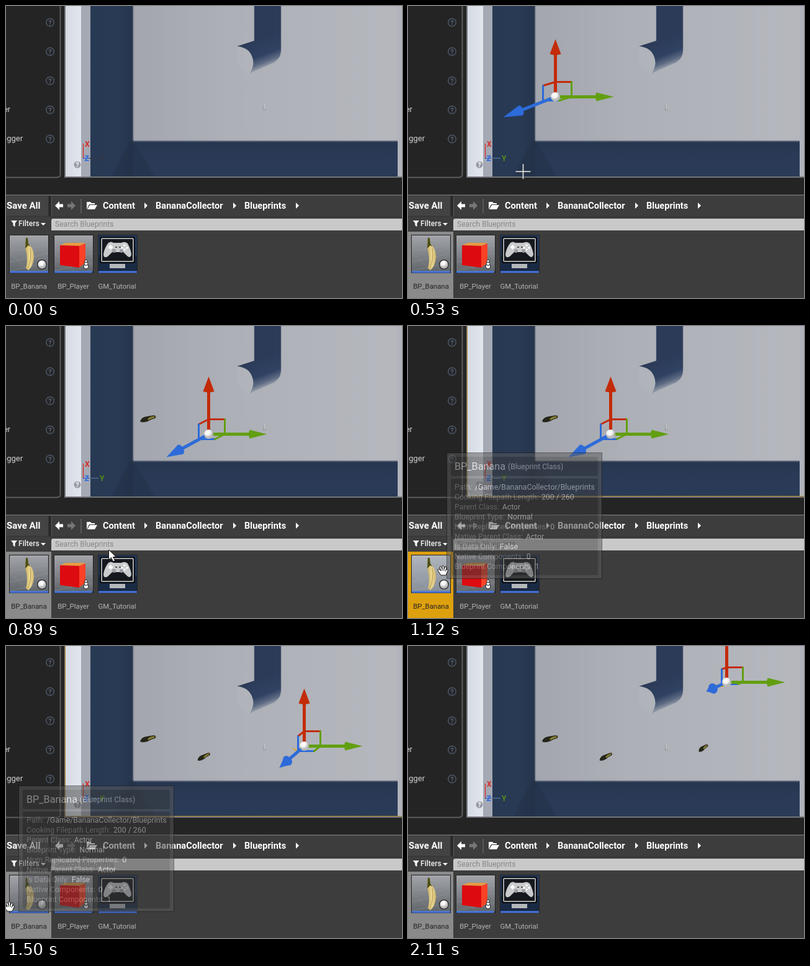
Recreate the animation shown at these times as an HTML page. Size 638 by 471 pixels, loop 2.16 s.

```html
<!DOCTYPE html>
<html lang="en">
<head>
<meta charset="utf-8">
<title>Placing blueprints</title>
<style>
html, body { margin: 0; width: 100%; height: 100%; overflow: hidden; background: #242424; }
svg { display: block; width: 638px; height: 471px; }
text { font-family: Roboto, "Open Sans", sans-serif; font-size: 12.1px; white-space: pre; }
.path { font-size: 14.6px; font-weight: 700; fill: #fff; }
.label { font-size: 11.4px; fill: #b4b4b4; text-anchor: middle; }
.axis { font-size: 12px; font-weight: 700; }
.side { font-size: 13px; fill: #d4d4d4; }
.row { font-size: 12.3px; fill: #9b9b9b; }
</style>
</head>
<body>
<svg viewBox="0 0 638 471">
  <defs>
    <linearGradient id="floor"><stop offset="0" stop-color="#a3a6ae"/><stop offset=".35" stop-color="#adb0b7"/><stop offset="1" stop-color="#b6b8be"/></linearGradient>
    <linearGradient id="wall"><stop offset="0" stop-color="#283953"/><stop offset=".6" stop-color="#293a55"/><stop offset="1" stop-color="#26354d"/></linearGradient>
    <linearGradient id="base" x2="0" y2="1"><stop offset="0" stop-color="#263650"/><stop offset=".4" stop-color="#2a3a56"/><stop offset="1" stop-color="#2a3b58"/></linearGradient>
    <linearGradient id="edge"><stop offset="0" stop-color="#d5dae3"/><stop offset="1" stop-color="#e2e7ee"/></linearGradient>
    <linearGradient id="pillar" gradientUnits="userSpaceOnUse" x1="398" y1="56" x2="416" y2="102"><stop offset="0" stop-color="#2b3b58"/><stop offset=".55" stop-color="#304262"/><stop offset=".78" stop-color="#5c6982"/><stop offset="1" stop-color="#abaeb6"/></linearGradient>
    <linearGradient id="thumb" x2="0" y2="1"><stop offset="0" stop-color="#a3a5aa"/><stop offset=".35" stop-color="#8b8e93"/><stop offset="1" stop-color="#62676c"/></linearGradient>
    <linearGradient id="peel"><stop offset="0" stop-color="#c6ad5c"/><stop offset=".5" stop-color="#ead795"/><stop offset="1" stop-color="#d5bb70"/></linearGradient>
    <radialGradient id="ball" cx=".4" cy=".3"><stop offset="0" stop-color="#fff"/><stop offset=".6" stop-color="#f1f1f1"/><stop offset="1" stop-color="#b9b9b9"/></radialGradient>
    <filter id="soft"><feGaussianBlur stdDeviation="1"/></filter>
    <clipPath id="view"><path d="M96 0H638V275H96z"/></clipPath>
    <g id="help"><circle r="6.3" fill="none" stroke="#4c5768" stroke-width="1.5"/><text y="4" text-anchor="middle" font-weight="700" style="font-size:11px" fill="#566174">?</text></g>
    <g id="fruit">
      <path d="M-13 4Q-11 -3 -3 -4L9 -6Q15 -5 11 -1Q5 0 1 3Q-8 7 -13 4z" fill="#25251a"/>
      <path d="M0 1Q4 -3 10 -3" fill="none" stroke="#858231" stroke-width="3"/>
      <path d="M9 -5L12 -4" stroke="#654b31" stroke-width="2"/>
    </g>
    <path id="chevron" d="M0 -5L5 0L0 5z" fill="#fff"/>
  </defs>

  <!-- details panel -->
  <path d="M0 0H88V271Q88 277 82 277H0z" fill="#242424"/>
  <path d="M87.5 0V271Q87.5 276.5 82 276.5H0" fill="none" stroke="#5c5c5c" stroke-width="2"/>
  <text class="side" x="-4.3" y="171">er</text>
  <text class="side" x="-2" y="218">igger</text>
  <g id="helps"></g>

  <!-- viewport -->
  <path d="M94 0H638V277H94z" fill="#737579"/>
  <g clip-path="url(#view)">
    <path d="M96 0H121V275H96z" fill="url(#edge)"/>
    <path d="M121 0H136V275H121z" fill="#a5a9b4"/>
    <path d="M136 0H205V275H136z" fill="url(#wall)"/>
    <path d="M205 217H631V275H205z" fill="url(#base)"/>
    <path d="M205 217L240 275H170L200 217z" fill="#202d43" opacity=".4" filter="url(#soft)"/>
    <path d="M205 -5H640V217.7H205z" fill="url(#floor)" filter="url(#soft)"/>
    <path d="M631 0H638V275H631z" fill="#b0b3bb"/>
    <path d="M400 0H443V72Q443 84 432 91L392 109Q400 98 398 87Q394 67 372 65L400 56z" fill="url(#pillar)"/>
    <path d="M400 0V56M443 0V72" stroke="#59657b" opacity=".5"/>
    <path d="M372 65Q394 67 398 87Q400 98 392 109Q381 106 372 92z" fill="#b6b8be" opacity=".5"/>
    <path d="M414.5 159V168H419" fill="none" stroke="#94979d"/><path d="M416 158V165" stroke="#c9cbcf"/>
    <circle cx="115" cy="256" r="5.5" fill="#999ca4"/>
    <text x="115" y="260" text-anchor="middle" font-weight="700" style="font-size:10px" fill="#fff">?</text>
    <path d="M124.5 222V245" stroke="#d92b25" stroke-width="1.3"/>
    <path d="M124 245.5H134" stroke="#245ed0" stroke-width="1.3"/>
    <path id="yLine" d="M134 245.5H149" stroke-width="1.3"/>
    <text class="axis" x="127" y="227" fill="#d92b25">X</text>
    <text class="axis" x="126.5" y="250" fill="#2868e0">Z</text>
    <text class="axis" id="yText" x="151" y="250">Y</text>
    <g id="fruits"></g>
    <g id="gizmo"></g>
  </g>
  <path id="focus" d="M95.5 0V274.5H638" fill="none" stroke="#b98a2c"/>

  <!-- content browser -->
  <path d="M0 278H638V304H0z" fill="#242424"/>
  <path d="M0 305H638V471H0z" fill="#3d3d3d"/>
  <path d="M0 305H638" stroke="#606060" stroke-width="2"/>
  <path d="M0 307H68V338H0z" fill="#434343"/>
  <path d="M70.5 306V339" stroke="#292929" stroke-width="4"/>
  <path d="M73.5 307V338" stroke="#555"/>
  <path d="M0 339.5H638" stroke="#353535"/>
  <text class="path" x="1" y="327" style="font-size:15px">Save All</text>
  <path d="M79 322L86 315V319.5H92V324.5H86V329z" fill="#fff"/>
  <path d="M112 322L105 315V319.5H99V324.5H105V329z" fill="#777"/>
  <path d="M121 311V334" stroke="#777"/>
  <path d="M130 328V316H136L138 318H143V320H134zM131 328L135 321H147L143 328z" fill="#fff"/>
  <text class="path" x="156" y="327">Content</text>
  <text class="path" x="241" y="327">BananaCollector</text>
  <text class="path" x="384" y="327">Blueprints</text>
  <use href="#chevron" x="223" y="322"/><use href="#chevron" x="366" y="322"/><use href="#chevron" x="467" y="322"/>
  <path d="M8 346H18L14.5 350.5V356L11.5 354V350.5z" fill="#fff"/>
  <text x="20" y="355" fill="#f0f0f0" font-weight="500">Filters</text>
  <path d="M56 350H64L60 354z" fill="#fff"/>
  <path d="M76 343H638V362H73V346Q73 343 76 343z" fill="#c9c9c9"/>
  <text x="79" y="356" fill="#858585">Search Blueprints</text>

  <path id="tile" d="M0 364H73V471H0z"/>
  <g id="thumbs"></g>
  <path id="glow" d="M6 370H68V428H6z" fill="#c3cddd" opacity=".4"/>
  <g>
    <path d="M32 374L35 374L36 383Q45 391 45 405Q44 420 36 426L32 423Q36 409 32 394L31 386z" fill="url(#peel)"/>
    <path d="M32 374H35L36 383L40 389L36 386L31 391z" fill="#4c4e19"/>
    <path d="M39 390Q42 407 35 424" fill="none" stroke="#b79d51"/>
    <circle cx="58" cy="417" r="8" fill="#262626"/><circle cx="58" cy="417" r="6.7" fill="url(#ball)"/>
    <path d="M87 386L97 382H128L118 387z" fill="#e89a42"/>
    <path d="M87 386L118 387V422L87 418z" fill="#dd0b10"/>
    <path d="M118 387L128 383V414L118 422z" fill="#fb4126"/>
    <g fill="#f0f0f0" stroke="#222"><circle cx="129" cy="420" r="4"/><circle cx="129" cy="415.5" r="3"/><circle cx="129" cy="411.5" r="2.2"/></g>
    <path d="M149 370H211V428H149z" fill="#243a60"/>
    <path d="M149 402L180 412L211 402V428H149z" fill="#192a45"/>
    <rect x="152" y="373" width="55" height="41" rx="2" fill="#0f1115" stroke="#090b0e" stroke-width="2"/>
    <rect x="154" y="375" width="51" height="37" rx="1" fill="#15181c" stroke="#d2d5d8" stroke-width="1.5"/>
    <path d="M167 416H192V423H167z" fill="#b4b7bb"/>
    <path d="M165 382Q169 379 173 382H186Q191 379 196 383Q201 392 202 401Q200 408 195 403L189 397H171L164 404Q157 408 157 400Q159 389 165 382z" fill="#c9cbcd"/>
    <path d="M165 389H172M168.5 385.5V392.5" stroke="#fff" stroke-width="3"/>
    <path d="M176 389H179M182 389H185" stroke="#555" stroke-width="2"/>
    <g fill="#fff"><circle cx="191" cy="386" r="1.8"/><circle cx="195" cy="390" r="1.8"/><circle cx="191" cy="393" r="1.8"/><circle cx="187" cy="390" r="1.8"/></g>
    <g fill="#9a9da1"><circle cx="174" cy="395" r="3"/><circle cx="186" cy="395" r="3"/></g>
  </g>
  <path d="M6 429H68M78 429H139M149 429H211" stroke="#4677df" stroke-width="3"/>
  <text class="label" id="tileText" x="37" y="456">BP_Banana</text>
  <text class="label" x="108.5" y="456">BP_Player</text>
  <text class="label" x="179" y="456">GM_Tutorial</text>

  <g id="tip"></g>
  <g id="hand" stroke="#111" stroke-width="1" stroke-linejoin="round">
    <path d="M-3 8L-8 0Q-8 -3 -5 -1L-3 1L-5 -5Q-4 -8 -2 -5L-1 -2V-7Q1 -9 2 -6V-2L4 -6Q6 -7 6 -4L5 0L7 -2Q9 -2 8 1L5 8z" fill="#fff"/>
    <path d="M-1 -2V1M2 -2V1M5 0L4 2" fill="none"/>
  </g>
  <path id="arrow" d="M0 0V16L4 12.5L7 19L10 17.5L7 11.5H12z" fill="#fff" stroke="#111"/>
  <g id="cross" fill="none"><path d="M-12 0H12M0 -12V12" stroke="#424242" stroke-width="2.6" opacity=".35"/><path d="M-12 0H12M0 -12V12" stroke="#f0f0e6" stroke-width="1.5"/></g>
</svg>
<script>
const $ = id => document.getElementById(id);
const line = (x1, y1, x2, y2, color, width = 3) =>
  `<path d="M${x1} ${y1}L${x2} ${y2}" stroke="${color}" stroke-width="${width}" stroke-linecap="round"/>`;
const place = (el, x, y) => el.setAttribute("transform", `translate(${x} ${y})`);
const toggle = (id, on) => $(id).style.display = on ? "" : "none";

$("helps").innerHTML = [0, 1, 2, 3, 4].map(i => `<use href="#help" x="71" y="${26.5 + i * 47}"/>`).join("");
$("thumbs").innerHTML = [6, 78, 149].map(x => `<g transform="translate(${x} 370)">
  <path d="M-1 -1H63V61H-1z" fill="#222"/><path d="M0 0H62V58H0z" fill="url(#thumb)"/>
  <path d="M0 26L62 16M0 43L62 29M0 57L62 44M0 28L32 58M24 22L62 50" stroke="#a5a9ac" opacity=".3"/></g>`).join("");

const rows = [
  ["Path", "/Game/BananaCollector/Blueprints"], ["Cooking Filepath Length", "200 / 260"],
  ["Parent Class", "Actor"], ["Blueprint Type", "Normal"], ["Num Replicated Properties", "0"],
  ["Native Parent Class", "Actor"], ["Is Data Only", "False"],
  ["Native Components", "0"], ["Blueprint Components", "1"]
];
$("tip").innerHTML = `<rect x=".5" y=".5" width="250" height="203" fill="#5b5b5b" stroke="#151515"/>
  <rect x="7" y="7" width="237" height="31" rx="3" fill="#3d3d3d"/>
  <rect x="7" y="42" width="237" height="156" rx="3" fill="#3d3d3d"/>
  <text x="13" y="28" fill="#e6e6e6" style="font-size:16.2px">BP_Banana</text>
  <text x="99" y="27" fill="#d6d6d6">(Blueprint Class)</text>` +
  rows.map(([key, value], i) => `<text class="row" x="13" y="${60 + i * 16}">${key}: <tspan dx="1.5" fill="#ececec">${value}</tspan></text>`).join("");

const RED = "#c32b08", GREEN = "#629f10", BLUE = "#2d6bd9";

// tx, ty: tip of the blue arrow; bx, by: its share of the plane handles
function drawGizmo({ x, y, tx, ty, bx, by }) {
  const len = Math.hypot(tx, ty), ux = tx / len, uy = ty / len;
  const cx = tx * .67, cy = ty * .67, angle = Math.atan2(uy, ux) * 180 / Math.PI;
  const depth = 9 - len / 20;
  place($("gizmo"), x + .5, y + .5);
  $("gizmo").innerHTML =
    `<path d="M-18 4Q-13 8 -5 6" fill="none" stroke="#e7a51e" stroke-width="2"/>` +
    line(0, -24, 26, -24, RED) + line(26, -24, 26, 0, GREEN) +
    line(0, -24, bx, by - 24, RED) + line(bx, by - 24, bx, by, BLUE) +
    line(bx, by, bx + 26, by, BLUE) + line(bx + 26, by, 26, 0, GREEN) +
    line(0, 0, 0, -70, RED, 5) + line(0, 0, 67, 0, GREEN, 5) + line(0, 0, cx, cy, BLUE, 5) +
    `<path d="M0 -93L9 -69Q0 -66 -9 -69z" fill="${RED}"/>
     <path d="M94 0L66 -7Q63 0 66 7z" fill="${GREEN}"/>
     <path d="M${tx} ${ty}L${cx - uy * 8.5} ${cy + ux * 8.5}L${cx + uy * 8.5} ${cy - ux * 8.5}z" fill="${BLUE}"/>
     <ellipse rx="${depth}" ry="8.5" transform="translate(${cx} ${cy}) rotate(${angle})" fill="${BLUE}"/>
     <circle r="7.5" fill="url(#ball)"/>`;
}

const spots = [
  { x: 237, y: 146, tx: -84, ty: 33, bx: -20, by: 6 },
  { x: 326, y: 174, tx: -68, ty: 37, bx: -16, by: 8 },
  { x: 480, y: 161, tx: -40, ty: 35, bx: -10, by: 8 },
  { x: 513, y: 58, tx: -33, ty: 15, bx: -8, by: 3 }
];
const dropped = [[229, 150, 1, 0], [319, 179, .85, -10], [476, 165, .66, -12]];

const DARK = "#3d3d3d", GREY = "#8a8a8a", ORANGE = "#dda00f";
const steps = [
  { at: 0, spot: -1, tile: DARK },
  { at: 170, spot: -1, tile: "#5c5c5c", hand: [34, 408], tip: [47, 214, .4] },
  { at: 340, spot: -1, tile: ORANGE, hand: [34, 410], tip: [47, 214, 1] },
  { at: 530, spot: 0, tile: GREY, cross: [185.5, 267] },
  { at: 720, spot: 1, tile: GREY, cross: [276, 238] },
  { at: 890, spot: 1, tile: GREY, arrow: [165.5, 361] },
  { at: 1120, spot: 1, tile: ORANGE, focus: true, hand: [56, 394], tip: [62, 204, .52] },
  { at: 1310, spot: 2, tile: ORANGE, focus: true, cross: [440, 215] },
  { at: 1500, spot: 2, tile: GREY, focus: true, hand: [5, 420], tip: [20, 225, .5] },
  { at: 1720, spot: 2, tile: GREY, hand: [148, 386] },
  { at: 1930, spot: 3, tile: GREY, cross: [466, 120] },
  { at: 2110, spot: 3, tile: GREY }
];

function show(step) {
  const { spot, tile, tip } = step;
  $("tile").setAttribute("fill", tile);
  $("tileText").style.fill = tile === GREY || tile === ORANGE ? "#242424" : "#b4b4b4";
  const yColor = spot < 0 ? "#343941" : "#549112";
  $("yText").setAttribute("fill", yColor);
  $("yLine").setAttribute("stroke", spot < 0 ? yColor : "#547395");
  $("fruits").innerHTML = dropped.slice(0, Math.max(0, spot)).map(([x, y, size, turn]) =>
    `<use href="#fruit" transform="translate(${x} ${y}) rotate(${turn}) scale(${size} ${Math.max(size, .9)})"/>`).join("");
  toggle("focus", step.focus);
  toggle("glow", tile === ORANGE);
  toggle("gizmo", spot >= 0);
  if (spot >= 0) drawGizmo(spots[spot]);
  for (const name of ["hand", "arrow", "cross", "tip"]) {
    toggle(name, step[name]);
    if (step[name]) place($(name), step[name][0], step[name][1]);
  }
  if (tip) $("tip").setAttribute("opacity", tip[2]);
}

const LOOP = 2160, start = performance.now();
let current;
function tick(now) {
  const time = Math.max(0, now - start) % LOOP;
  const step = steps.findLast(s => s.at <= time);
  if (step !== current) show(current = step);
  requestAnimationFrame(tick);
}
tick(start);
</script>
</body>
</html>
```
